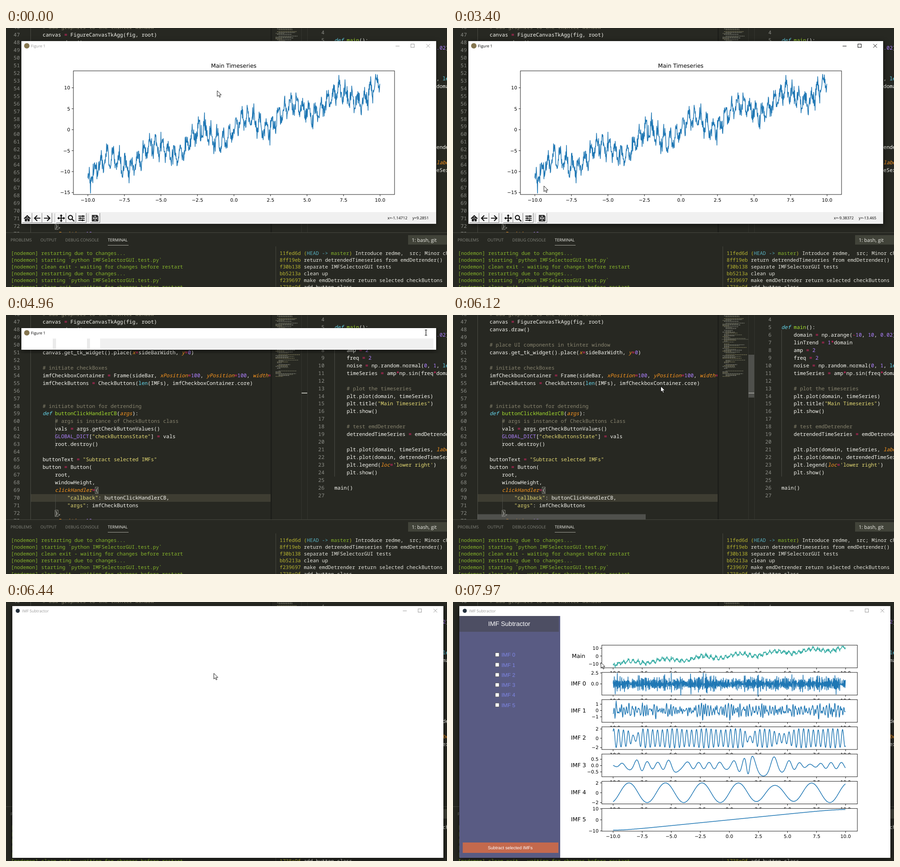
Write an HTML page that moves like this. It is 975 px wide and 574 px high and loops after 8000 ms.

```html
<!DOCTYPE html>
<html lang="en">
<head>
<meta charset="utf-8">
<title>Time series detrending</title>
<style>
html, body { margin: 0; width: 100%; height: 100%; overflow: hidden; background: #272822; }
svg { display: block; width: 100vw; height: 100vh; }
text { white-space: pre; text-rendering: geometricPrecision; }
.code { font: 11.4px "Noto Sans Mono", monospace; fill: #f8f8f2; }
.term { font: 11.13px "Noto Sans Mono", monospace; fill: #e4e4dc; }
.ui { font: 8.6px "Open Sans", sans-serif; }
.tick { font: 10.4px "DejaVu Sans", sans-serif; }
.name { font: 12.4px "DejaVu Sans", sans-serif; }
.tk { font-family: "Liberation Sans", Arial, sans-serif; }
.plot { fill: none; stroke: #1f77b4; stroke-width: 1.5; stroke-linejoin: round; }
</style>
</head>
<body>
<svg viewBox="0 0 975 574" preserveAspectRatio="none">
  <defs>
    <clipPath id="left"><rect width="587" height="453"/></clipPath>
    <clipPath id="right"><rect x="666" width="309" height="453"/></clipPath>
    <filter id="blur" x="-5%" y="-10%" width="110%" height="120%"><feGaussianBlur stdDeviation="7"/></filter>
  </defs>
  <g id="editor"></g>
  <g id="bars" fill="#797977" opacity="0">
    <rect x="653" y="88" width="13" height="95" fill-opacity=".5"/>
    <rect x="54" y="441.5" width="372" height="11.5" fill-opacity=".5"/>
  </g>
  <g id="figure"></g>
  <g id="stub"></g>
  <g id="selector"></g>
  <path id="arrow" d="M0 0V12.6L2.9 9.9L5 14.6L7 13.7L5 9.2H9Z" fill="#fff" stroke="#000" stroke-width=".9"/>
  <path id="beam" d="M-2.6-6H-.7L0-5.4L.7-6H2.6M0-5.4V5.4M-2.6 6H-.7L0 5.4L.7 6H2.6" fill="none" stroke="#111" stroke-width="1.2"/>
</svg>
<script>
const $ = id => document.getElementById(id);
const esc = s => s.replace(/&/g, '&amp;').replace(/</g, '&lt;');
const rect = (x, y, w, h, fill, more = '') =>
  `<rect x="${x}" y="${y}" width="${w}" height="${h}" fill="${fill}" ${more}/>`;
const text = (x, y, s, cls, more = '') => `<text x="${x}" y="${y}" class="${cls}" ${more}>${s}</text>`;
const line = (d, color, w = 1, more = '') =>
  `<path d="${d}" fill="none" stroke="${color}" stroke-width="${w}" ${more}/>`;
const range = (n, fn) => Array.from({ length: n }, (_, i) => fn(i));
const MID = 'text-anchor="middle"', END = 'text-anchor="end"';

function rng(seed) {
  return () => {
    seed = seed + 0x6D2B79F5 | 0;
    let t = Math.imul(seed ^ seed >>> 15, 1 | seed);
    t = t + Math.imul(t ^ t >>> 7, 61 | t) ^ t;
    return ((t ^ t >>> 14) >>> 0) / 4294967296;
  };
}

// ---------- editor ----------
const STYLES = [
  [/^#.*/, '#88846f'],
  [/^(["']).*?\1/, '#e6db74'],
  [/^def\b/, '#66d9ef', 1],
  [/^(len)\b/, '#66d9ef'],
  [/^\w+(?==)/, '#fd971f', 1],
  [/^(GLOBAL_DICT|\d+(\.\d+)?)\b/, '#ae81ff'],
  [/^[=*+-]/, '#f92672'],
  [/^(\w+|\s+|.)/, '']
];

function highlight(src) {
  const isDef = /^ *def /.test(src);
  let out = '', prev = '';
  while (src) {
    for (const [re, color, italic] of STYLES) {
      const m = src.match(re);
      if (!m) continue;
      const s = m[0];
      let c = color, it = italic;
      if (isDef && !c && /\w/.test(s)) [c, it] = prev === '(' ? ['#fd971f', 1] : ['#a6e22e', 0];
      out += c ? `<tspan fill="${c}"${it ? ' font-style="italic"' : ''}>${esc(s)}</tspan>` : esc(s);
      prev = s;
      src = src.slice(s.length);
      break;
    }
  }
  return out;
}

const LEFT = `    # add graphics to the tkinter window
    canvas = FigureCanvasTkAgg(fig, root)
    canvas.draw()

    # place UI components in tkinter window
    canvas.get_tk_widget().place(x=sideBarWidth, y=0)

    # initiate checkBoxes
    imfCheckboxContainer = Frame(sideBar, xPosition=100, yPosition=100, width=200)
    imfCheckButtons = CheckButtons(len(IMFs), imfCheckboxContainer.core)


    # initiate button for detrending
    def buttonClickHandlerCB(args):
        # args is instance of CheckButtons class
        vals = args.getCheckButtonValues()
        GLOBAL_DICT["checkButtonsState"] = vals
        root.destroy()

    buttonText = "Subtract selected IMFs"
    button = Button(
        root,
        windowHeight,
        clickHandler={
            "callback": buttonClickHandlerCB,
            "args": imfCheckButtons
        },
        xPosition=10,`.split('\n');

const RIGHT = `
def main():
    domain = np.arange(-10, 10, 0.02)
    linTrend = 1*domain
    amp = 2
    freq = 2
    noise = np.random.normal(0, 1, len(domain))
    timeSeries = amp*np.sin(freq*domain) + noise

    # plot the timeseries
    plt.plot(domain, timeSeries)
    plt.title("Main Timeseries")
    plt.show()

    # test emdDetrender
    detrendedTimeSeries = emdDetrender(timeSeries)

    plt.plot(domain, timeSeries, label='main')
    plt.plot(domain, detrendedTimeSeries)
    plt.legend(loc='lower right')
    plt.show()

main()
`.split('\n');

const listing = (rows, first, numX, codeX, y0) => rows.map((s, i) => {
  const y = y0 + i * 16.95;
  return text(numX, y, first + i, 'code', END + ' style="fill:#8f908a"') + text(codeX, y, highlight(s), 'code');
}).join('');

function minimap() {
  const r = rng(11);
  const inks = ['#a5a69c', '#8d8e74', '#b8b9b0', '#a39c70'];
  return range(68, i => {
    const gap = r() < .14, x = 596 + Math.floor(r() * 3) * 3.4;
    const w = Math.min(652 - x, 8 + r() * 42);
    return gap ? '' : line(`M${x} ${2 + i * 2}h${w.toFixed(1)}`, inks[i % 4], 1.1, 'opacity=".85" stroke-dasharray="3 1"');
  }).join('') + rect(594, 53.5, 59, 1, '#5b5b50');
}

function terminal() {
  const logs = ['restarting due to changes...', 'starting `python IMFSelectorGUI.test.py`',
    'clean exit - waiting for changes before restart'];
  const commits = ['11fed6d', '8ff19eb return detrendedTimeseries from emdDetrender()',
    'f30b138 separate IMFSelectorGUI tests', 'bb5213a clean up',
    'f239697 make emdDetrender return selected checkButtons', '1738e9f add button class'];
  const paint = (s, c) => `<tspan fill="${c}">${esc(s)}</tspan>`;
  const head = paint(' (', '#b8b530') + paint('HEAD -> ', '#56adbc') + paint('master', '#86b42b') +
    paint(')', '#b8b530') + ' Introduce redme,  src; Minor changes';
  const tabs = [[10, 'PROBLEMS'], [76, 'OUTPUT'], [131, 'DEBUG CONSOLE'], [225, 'TERMINAL']];
  return rect(0, 453, 975, 121, '#272822') + rect(0, 453, 975, 1, '#46473f') +
    tabs.map(([x, s], i) => text(x, 473, s, 'ui', `style="font-size:9.1px;fill:${i > 2 ? '#f4f4ee' : '#84857d'}"`)).join('') +
    rect(225, 481, 46, 1, '#a5a59c') + rect(889, 459, 86, 21, '#414339') +
    text(897, 473.5, '1: bash, git', 'ui', 'style="font-size:11px;fill:#f0f0ea"') +
    rect(596, 484, 1, 90, '#46473f') +
    range(6, i => text(11, 503 + i * 15, '[nodemon] ' + logs[i % 3], 'term', 'style="fill:#86b42b"')).join('') +
    commits.map((s, i) => text(605, 503 + i * 15,
      paint(s.slice(0, 7), '#b8b530') + (i ? esc(s.slice(7)) : head), 'term')).join('');
}

$('editor').innerHTML = rect(0, 0, 975, 574, '#272822') +
  `<g clip-path="url(#left)">` + rect(54, 397, 533, 17, '#3e3d32') +
  line('M54.5 0V453M109.5 228V296M109.5 397V431', '#4b4c45') +
  rect(197.3, 381.5, 6.6, 14, 'none', 'stroke="#92928a"') + rect(108.5, 432.5, 6.6, 14, 'none', 'stroke="#92928a"') +
  listing(LEFT, 46, 30.5, 53.6, 2.1) + '</g>' +
  rect(585, 0, 2.5, 453, '#1c1d19') + minimap() + line('M653.5 0V453M666.5 0V453', '#353630') +
  rect(653.5, 172, 12.5, 2, '#b5b5ae') +
  `<g clip-path="url(#right)">` + line('M726.5 33V358', '#4b4c45') + listing(RIGHT, 4, 704, 726, 14) + '</g>' +
  terminal();

// ---------- data ----------
const { sin, exp, sqrt, log, cos, PI } = Math;
const xs = range(1000, i => -10 + i * .02);
const bell = (x, c, h, w) => h * exp(-(((x - c) / w) ** 2));
const rand = rng(42);
const noise = xs.map(() => sqrt(-2 * log(rand() + 1e-9)) * cos(2 * PI * rand()));
const series = xs.map((x, i) => x + 2 * sin(2 * x) + 1.8 * sin(15 * x) + noise[i]);

const smooth = (a, k) => a.map((_, i) => {
  const part = a.slice(Math.max(0, i - k), i + k + 1);
  return part.reduce((s, v) => s + v, 0) / part.length;
});
const minus = (a, b) => a.map((v, i) => v - b[i]);
const scaleTo = (a, sd) => {
  const k = sd / sqrt(a.reduce((s, v) => s + v * v, 0) / a.length);
  return a.map(v => v * k);
};

const soft = smooth(smooth(noise, 2), 1);
const imf0 = scaleTo(minus(noise, smooth(noise, 2)), .82);
const imf1 = scaleTo(minus(soft, smooth(soft, 6)), .52);
const imf2 = xs.map(x => sin(15 * x) * (1.95 + .15 * sin(2.3 * x)) *
  (1 - bell(x, -8.15, .7, .4) - bell(x, 1.75, .75, .35) - bell(x, 4.5, .45, .8)));
// a wave that slows down and swells in places
let phase = -3.6;
const imf3 = xs.map(x => {
  phase += .02 * (7 - bell(x, -8.6, 3.4, .5) - bell(x, -4.3, 5, .65) - bell(x, -.15, 2.8, .5) +
    bell(x, 1.6, 4, .3) - bell(x, 2.9, 5.2, .85) - bell(x, 4.5, 3, .45));
  return sin(phase) * (.25 + bell(x, -7.9, .2, .8) + bell(x, -4.7, .28, .8) + bell(x, 2.8, .58, 2) -
    bell(x, 7, .15, 1) - bell(x, -10, .18, .8));
});
const imf4 = xs.map(x => 2 * sin(2 * x) * (1 - bell(x, 4, .25, 1.8)));
const imf5 = xs.map(x => 1.045 * (x - 10 * (x / 10) ** 9 / 9));

const polyline = (ys, x0, kx, y0, ky) =>
  'M' + xs.map((x, i) => (x0 + x * kx).toFixed(1) + ' ' + (y0 - ys[i] * ky).toFixed(1)).join('L');

// ---------- windows ----------
const minusSign = s => String(s).replace('-', '\u2212');
const shadow = (x, y, w, h, id) => rect(x, y + 3, w, h, '#000', `opacity=".55" filter="url(#blur)" id="${id}"`);
const controls = (right, cy, id) => {
  const x = right - 16.7, s = right - 51, m = right - 84.3;
  return `<g id="${id}" fill="none" stroke="#999"><path d="M${m - 4.3} ${cy + .5}H${m + 4.3}"/>` +
    `<rect x="${s - 3.8}" y="${cy - 4}" width="7.4" height="7.4"/></g>` +
    line(`M${x - 4} ${cy - 4}l8 8m0-8l-8 8`, '#999', 1, `id="${id}X"`);
};
const xTicks = (x0, k, y) => range(9, i => {
  const v = -10 + i * 2.5, x = x0 + v * k;
  return line(`M${x} ${y}v3.7`, '#000', .9) + text(x, y + 15.5, minusSign(v.toFixed(1)), 'tick', MID);
}).join('');
const yTicks = (x, y0, k, vals) => vals.map(v => {
  const y = y0 - v * k;
  return line(`M${x} ${y}h-3.7`, '#000', .9) + text(x - 7.2, y + 3.8, minusSign(v), 'tick', END);
}).join('');

function toolbar() {
  const icons = [
    [36, 'M-7 1L0-5.5L7 1M-4.2 1V6H-1.8V2H1.8V6H4.2V1M-4-1H4'],
    [58, 'M7 0H-5M0-6L-6 0L0 6'],
    [80, 'M-7 0H5M0-6L6 0L0 6'],
    [111, 'M-7 0H7M0-7V7M-5-2L-7 0L-5 2M5-2L7 0L5 2M-2-5L0-7L2-5M-2 5L0 7L2 5'],
    [133, 'M3-1.5A4.6 4.6 0 1 1-6.2-1.5A4.6 4.6 0 1 1 3-1.5M2 2L7 7'],
    [156, 'M-7-4.5H7M-7 0H7M-7 4.5H7M3-6.5V-2.5M-3-2V2M2 2.5V6.5'],
    [186, 'M-6-6H4L6-4V6H-6ZM-3-6V-2H3V-6M-3 6V2H3V6']
  ];
  return rect(34, 408, 917, 26, '#f0f0f0') + icons.map(([x, d]) =>
    rect(x, 410, 22, 22, '#f4f4f4') + line(`M${x + .5} 432V410.5H${x + 22}`, '#fff') +
    line(`M${x} 431.5H${x + 21.5}V410`, '#7a7a7a') +
    line(d, '#111', 2.2, `transform="translate(${x + 11} 421.5)"`)).join('') +
    line('M107.5 411V431M181.5 411V431', '#bbb');
}

const icon = '<circle cx="46" cy="39.5" r="6" fill="#857650"/>';
$('figure').innerHTML = shadow(34, 29, 917, 405, 'glow') + rect(34, 29, 917, 405, '#fff') + icon +
  text(55.3, 43, 'Figure 1', 'ui', 'id="caption"') + rect(917, 29, 34, 22, '#e81123', 'id="hot" opacity="0"') +
  controls(950, 39.6, 'ctl') + toolbar() + text(889, 424, '', 'ui', MID + ' id="coords"') +
  text(503.5, 87.5, 'Main Timeseries', 'name', MID) +
  rect(149, 95, 710, 274, 'none', 'stroke="#000" stroke-width=".9"') +
  xTicks(504, 32.3, 369) + yTicks(149, 225.3, 9.29, [10, 5, 0, -5, -10, -15]) +
  `<path class="plot" d="${polyline(series, 504, 32.3, 225.3, 9.29)}"/>`;

$('stub').innerHTML = shadow(34, 29, 917, 48, 'stubGlow') + rect(34, 29, 917, 48, '#fff') + icon +
  text(55.3, 43, 'Figure 1', 'ui') + rect(35, 52, 910, 24, '#f0f0f0') +
  [[35, 68], [111, 68], [186, 22]].map(([x, w]) => rect(x, 52, w, 24, '#fff')).join('') +
  line('M105.5 53V75M108.5 53V75M180.5 53V75M183.5 53V75', '#e0e0e0');

const PLOTS = [
  ['Main', 119.7, 1.715, [10, 0, -10], series],
  ['IMF 0', 181.5, 9.75, ['2.5', '0.0'], imf0],
  ['IMF 1', 240.5, 14, [1, 0, -1], imf1],
  ['IMF 2', 302, 10.3, [2, 0, -2], imf2],
  ['IMF 3', 362.5, 28, ['0.5', '0.0', '-0.5'], imf3],
  ['IMF 4', 422.7, 10.9, [2, 0, -2], imf4],
  ['IMF 5', 482.8, 2.45, [10, 0, -10], imf5]
];

// each axes box hides most of the labels of the one above
const charts = PLOTS.map(([name, y0, k, ticks, ys], i) => {
  const top = 95.7 + i * 60.33;
  return rect(329, top, 565, 50.2, '#fff', 'stroke="#000" stroke-width=".9"') +
    xTicks(611, 25.7, top + 50.2) + yTicks(329, y0, k, ticks) +
    `<path class="plot" d="${polyline(ys, 611, 25.7, y0, k)}"${i ? '' : ' style="stroke:#3aaea6"'}/>` +
    text(277.5, top + 28.6, name, 'name', MID);
}).join('');

const sidebar = rect(14, 31, 223, 536, '#595b83') + rect(14, 31, 220, 35, '#4d4e63') +
  text(124.3, 53.3, 'IMF Subtractor', 'tk', MID + ' font-size="14.06" fill="#fff"') +
  range(6, i => {
    const y = 112.5 + i * 22.3;
    return rect(93.5, y, 8.5, 8.5, '#fff', 'stroke="#555" stroke-width=".9"') +
      text(107.3, y + 8.7, 'IMF ' + i, 'tk', 'font-size="11.9" fill="#7f87e6"');
  }).join('') +
  rect(21.5, 533, 211.5, 23, '#c4694d') +
  text(126.5, 548, 'Subtract selected IMFs', 'tk', MID + ' font-size="9.7" fill="#fff"');

$('selector').innerHTML = shadow(14, 9, 953, 558, 'wideGlow') + rect(14, 9, 953, 558, '#fff') +
  '<circle cx="26" cy="19.5" r="4.5" fill="#24303c"/>' +
  text(35.5, 22.8, 'IMF Subtractor', 'ui', 'fill="#999"') + controls(966, 19.2, 'ctl2') +
  `<g id="side">${sidebar}</g><g id="charts">${charts}</g>`;

// ---------- motion ----------
// pointer stops: time, x, y
const PATH = [[80, 467, 139], [840, 560, 86], [1400, 447, 84], [1860, 299, 266], [2280, 392, 236], [2700, 735, 108],
  [3130, 850, 165], [3400, 201, 350], [3950, 925, 38], [4260, 928.5, 39], [4960, 928.5, 39],
  [6050, 459.5, 158], [6510, 459.5, 158], [7130, 593, 32], [7950, 327, 134], [8000, 327, 134]];
const ramp = (t, a, b) => Math.max(0, Math.min(1, (t - a) / (b - a)));
const ease = u => u * u * (3 - 2 * u);
const show = (id, on) => $(id).style.display = on ? '' : 'none';

function pointer(t) {
  const i = Math.max(1, PATH.findIndex(p => p[0] > t));
  const [a, x, y] = PATH[i - 1], [b, X, Y] = PATH[i];
  const u = ease(ramp(t, a, b));
  return [x + (X - x) * u, y + (Y - y) * u];
}

function draw(t) {
  const [x, y] = pointer(t);
  const beam = t >= 4960 && t < 5700;
  show('arrow', !beam);
  show('beam', beam);
  for (const id of ['arrow', 'beam']) $(id).setAttribute('transform', `translate(${x.toFixed(1)} ${y.toFixed(1)})`);
  $('beam').setAttribute('stroke', t < 5040 ? '#111' : '#eee');

  show('figure', t < 4960);
  show('stub', t >= 4960 && t < 5040);
  const ink = t < 80 ? '#999' : '#000', hover = ramp(t, 4020, 4180);
  $('caption').setAttribute('fill', ink);
  $('ctl').setAttribute('stroke', ink);
  $('ctlX').setAttribute('stroke', hover > .4 ? '#fff' : ink);
  $('glow').setAttribute('opacity', t < 80 ? .35 : .6);
  $('hot').setAttribute('opacity', hover);
  $('hot').setAttribute('fill', t < 4790 ? '#e81123' : '#f1707a');
  const inside = x > 149 && x < 859 && y > 95 && y < 369;
  $('coords').textContent = inside
    ? `x=${((x - 504.045) / 32.294).toPrecision(6)}${'\u00a0'.repeat(5)}y=${((225.116 - y) / 9.2746).toPrecision(5)}` : '';

  $('bars').setAttribute('opacity', ramp(t, 5350, 5480));

  const open = ramp(t, 6200, 6360), k = .92 + .08 * ease(open);
  show('selector', open > 0);
  $('selector').setAttribute('opacity', open);
  $('selector').setAttribute('transform', `translate(490 288) scale(${k}) translate(-490 -288)`);
  show('side', t >= 6510);
  show('charts', t >= 6590);
}

const start = performance.now();
function tick() {
  draw((performance.now() - start) % 8000);
  requestAnimationFrame(tick);
}
draw(0);
requestAnimationFrame(tick);
</script>
</body>
</html>
```
